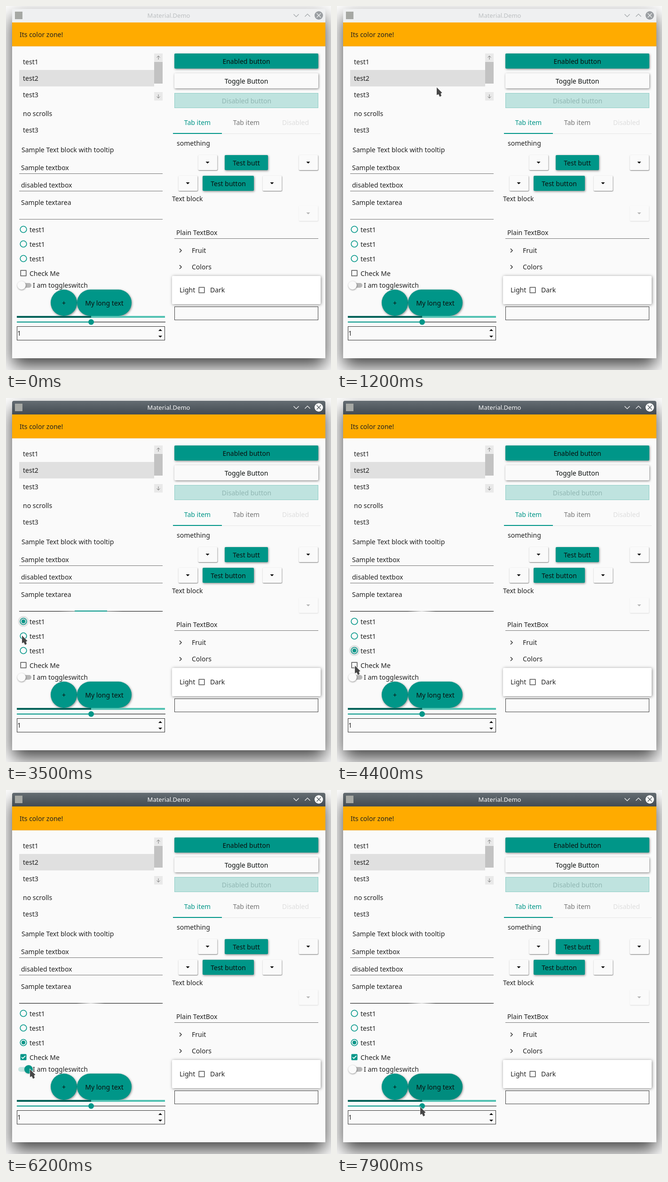
Recreate the animation shown at these times as an HTML page with a canvas. Size 691x774 px, loop 8 s.

```html
<!DOCTYPE html>
<html lang="en">
<head>
<meta charset="utf-8">
<title>Widget gallery</title>
<style>
  html, body { margin: 0; width: 100%; height: 100%; overflow: hidden; background: #fff; }
  canvas { display: block; }
</style>
</head>
<body>
<canvas id="stage" width="691" height="774"></canvas>
<script>
const ctx = document.getElementById('stage').getContext('2d');
const LOOP = 8000, STEP = 100;
const TEAL = '#009688', PAPER = '#fafafa', INK = '#212121', GREY = '#757575';

// Pointer path: time, x, y
const POINTER = [
  [200, 238, 203], [500, 222, 190], [800, 212, 173], [1400, 212, 173],
  [1600, 205, 270], [1800, 165, 525], [1900, 150, 480], [2100, 140, 437], [2600, 140, 437],
  [2900, 90, 455], [3200, 35, 473], [3400, 34, 478], [3500, 34, 505], [3700, 35, 506],
  [4000, 35, 536], [4200, 36, 538], [4400, 38, 569], [4500, 38, 583], [4600, 38, 583],
  [4800, 40, 601], [5200, 37, 567], [5400, 38, 570], [5500, 39, 579], [5600, 39, 579],
  [5800, 44, 608], [5900, 46, 596], [6200, 51, 594], [6500, 51, 594],
  [6900, 118, 632], [7100, 124, 651], [7200, 150, 640], [7400, 220, 632],
  [7600, 318, 684], [7700, 290, 683], [7900, 177, 674]
];

const clamp = v => Math.max(0, Math.min(1, v));
const ramp = (t, from, to) => clamp((t - from) / (to - from));
const between = (t, from, to) => t >= from && t < to;

function pointerAt(t) {
  if (t < POINTER[0][0]) return null;
  const next = POINTER.findIndex(p => p[0] > t);
  if (next < 0) return POINTER.at(-1).slice(1);
  const [t0, x0, y0] = POINTER[next - 1], [t1, x1, y1] = POINTER[next];
  const k = ramp(t, t0, t1);
  return [x0 + (x1 - x0) * k, y0 + (y1 - y0) * k].map(Math.round);
}

function rect(x, y, w, h, fill) {
  ctx.fillStyle = fill;
  ctx.fillRect(x, y, w, h);
}

function frame(x, y, w, h, color, width = 1) {
  ctx.strokeStyle = color;
  ctx.lineWidth = width;
  ctx.strokeRect(x + width / 2, y + width / 2, w - width, h - width);
}

function text(str, x, y, color = INK, align = 'left', size = 14) {
  ctx.font = `${size}px "Noto Sans", sans-serif`;
  ctx.textAlign = align;
  ctx.fillStyle = color;
  ctx.fillText(str, x, y);
}

function withShadow(dx, dy, blur, alpha, paint) {
  ctx.save();
  ctx.shadowColor = `rgba(0,0,0,${alpha})`;
  ctx.shadowOffsetX = dx;
  ctx.shadowOffsetY = dy;
  ctx.shadowBlur = blur;
  paint();
  ctx.restore();
}

function rounded(x, y, w, h, r, fill) {
  ctx.beginPath();
  ctx.roundRect(x, y, w, h, r);
  ctx.fillStyle = fill;
  ctx.fill();
}

function disc(x, y, r, fill) {
  ctx.beginPath();
  ctx.arc(x, y, r, 0, 7);
  ctx.fillStyle = fill;
  ctx.fill();
}

function path(points, closed) {
  ctx.beginPath();
  points.forEach(([x, y]) => ctx.lineTo(x, y));
  if (closed) ctx.closePath();
}

function polyline(points, color, width = 1) {
  path(points);
  ctx.strokeStyle = color;
  ctx.lineWidth = width;
  ctx.stroke();
}

function triangle(x, y, w, h, color = '#000') {
  path([[x - w, y - h], [x + w, y - h], [x, y + h]], true);
  ctx.fillStyle = color;
  ctx.fill();
}

function button(label, x, y, w, h, fill = TEAL, r = 2) {
  withShadow(1, 1.5, 4, 0.45, () => rounded(x, y, w, h, r, fill));
  text(label, x + w / 2, y + h / 2 + 6, '#0a0f0e', 'center');
}

function dropDown(x, y, enabled = true) {
  withShadow(0.5, 1, 2, enabled ? 0.55 : 0.12, () => rounded(x, y, 41, 32, 2, PAPER));
  triangle(x + 20, y + 16, 4, 2, enabled ? '#000' : '#b4b4b4');
}

function titleBar(t) {
  const active = t < 2300 ? 0 : t < 2400 ? 0.8 : 1;
  rounded(13, 6, 666, 30, [4, 4, 0, 0], '#eff0f1');
  const shade = ctx.createLinearGradient(0, 6, 0, 35);
  shade.addColorStop(0, '#646c72');
  shade.addColorStop(1, '#434b52');
  ctx.globalAlpha = active;
  rounded(13, 6, 666, 30, [4, 4, 0, 0], shade);
  ctx.globalAlpha = 1;
  const fore = active ? '#fcfcfc' : '#bcbfc1';
  text('Material.Demo', 346, 25, fore, 'center', 13);
  rect(19, 12, 16, 16, '#a6a8a4');
  const glyph = active ? '#fcfcfc' : '#a0a4a7';
  polyline([[611.5, 17.5], [617, 23], [622.5, 17.5]], glyph, 1.2);
  polyline([[635.5, 22.5], [641, 17], [646.5, 22.5]], glyph, 1.2);
  disc(665, 20, 9, active ? '#fcfcfc' : '#9a9ea2');
  const cross = active ? '#4b5359' : '#eff0f1';
  polyline([[660.5, 15.5], [669.5, 24.5]], cross, 1.2);
  polyline([[669.5, 15.5], [660.5, 24.5]], cross, 1.2);
}

function scrollButton(y, dir) {
  rect(315, y, 18, 18, '#e9e9e9');
  const c = y + 9;
  polyline([[324, c - 4], [324, c + 4]], '#777');
  polyline([[320.5, c + dir * 0.5], [324, c + dir * 4], [327.5, c + dir * 0.5]], '#777');
}

function list(t, pointer) {
  const scroll = between(t, 900, 1100) ? 40 : 0;
  const hovered = pointer && t < 1600 && pointer[1] < 176;
  ctx.save();
  ctx.beginPath();
  ctx.rect(28, 101, 287, 100);
  ctx.clip();
  rect(28, 136 - scroll, 287, 35, hovered ? '#dedede' : '#e0e0e0');
  for (let i = 0; i < 4; i++) text('test' + (i + 1), 36, 124 + 35 * i - scroll);
  ctx.restore();
  rect(315, 101, 18, 100, PAPER);
  scrollButton(101, -1);
  scrollButton(183, 1);
  rect(315, 119 + scroll * 0.45, 18, 46, '#c2c2c2');
  text('no scrolls', 36, 234);
  text('test3', 36, 269);
}

function textFields(t) {
  text('Sample Text block with tooltip', 33, 311);
  text('Sample textbox', 32, 349);
  rect(28, 356, 305, 1, GREY);
  text('disabled textbox', 32, 386);
  rect(28, 393, 305, 1, GREY);
  text('Sample textarea', 32, 423);
  rect(28, 453, 305, 1, t < 2300 ? GREY : t < 3400 ? '#555' : '#000');

  if (t >= 3400) {
    const reach = t < 3500 ? 110 : t < 3600 ? 68 : 30;
    const glow = ctx.createLinearGradient(180 - reach, 0, 180 + reach, 0);
    glow.addColorStop(0, 'rgba(250,250,250,0)');
    glow.addColorStop(0.5, 'rgba(250,250,250,.85)');
    glow.addColorStop(1, 'rgba(250,250,250,0)');
    rect(180 - reach, 453, 2 * reach, 1, glow);
  }
  const half = t < 2300 ? 0 : t < 2400 ? 50 : t < 3400 ? 152.5 : t < 3500 ? 105 : t < 3600 ? 34.5 : 0;
  rect(180.5 - half, 452, 2 * half, 2, TEAL);
  if (between(t, 2300, 3400)) rect(139, 409, 1, 18, '#000');
}

function radios(t) {
  const picked = t < 3300 ? -1 : t < 3700 ? 0 : t < 4100 ? 1 : 2;
  for (let i = 0; i < 3; i++) {
    const y = 475 + 31 * i;
    if (i === picked && t < 4500) disc(37, y, 11.5, '#e1e3e3');
    ctx.beginPath();
    ctx.arc(37, y, 6.8, 0, 7);
    ctx.strokeStyle = TEAL;
    ctx.lineWidth = 1.6;
    ctx.stroke();
    if (i === picked) disc(37, y, 4, TEAL);
    text('test1', 50, y + 6);
  }
}

function checkBox(x, y, checked) {
  if (!checked) return frame(x, y, 13, 13, '#555', 1.5);
  rounded(x, y, 13, 13, 1.5, TEAL);
  polyline([[x + 2.5, y + 6.5], [x + 5.2, y + 9.2], [x + 10.7, y + 3.7]], '#fff', 1.7);
}

function toggle(t) {
  const on = ramp(t, 5800, 6100) - ramp(t, 6300, 6600);
  const lit = on > 0.5;
  const x = 33 + 15 * on;
  rounded(26, 589, 28, 10, 5, lit ? '#c5e6e2' : '#b7b7b7');
  if (between(t, 5900, 6100) || between(t, 6400, 6700)) disc(x, 594, 13, 'rgba(0,0,0,.08)');
  withShadow(0.5, 1, 3, lit ? 0.25 : 0.45, () => disc(x, 594, 9, lit ? TEAL : PAPER));
  text('I am toggleswitch', 57, 599);
}

function lowerLeft(t) {
  checkBox(30.5, 561.5, t >= 5300);
  text('Check Me', 50, 574);
  toggle(t);
  button('+', 95, 603, 56, 56, between(t, 6800, 7300) ? '#008c7f' : TEAL, 28);
  button('My long text', 151, 603, 116, 56, t >= 7200 ? '#008c7e' : TEAL, 28);

  rect(23, 659, 158, 4, '#00635a');
  rect(181, 659, 157, 4, '#53c2b3');
  rect(23, 671, 158, 2, TEAL);
  rect(181, 671, 158, 2, GREY);
  disc(181, 672, 6, TEAL);

  frame(23, 681, 315, 30, '#333');
  text('1', 24, 701);
  triangle(328, 689, 4, -2);
  triangle(328, 703, 4, 2);
}

function rightColumn() {
  button('Enabled button', 358, 101, 306, 32);
  button('Toggle Button', 358, 143, 306, 32, PAPER);
  rounded(358, 185, 306, 32, 2, '#bfe3df');
  frame(358, 185, 306, 32, '#90cdc6');
  text('Disabled button', 511.5, 207, '#91b7b3', 'center');

  text('Tab item', 407, 253, TEAL, 'center');
  text('Tab item', 511, 253, GREY, 'center');
  text('Disabled', 615.5, 253, '#dedede', 'center');
  rect(459, 271, 210, 1, '#e5e5e5');
  rect(355, 270, 104, 2, TEAL);

  text('something', 363, 297);
  dropDown(408.5, 317);
  button('Test butt', 465, 317, 92, 32);
  dropDown(622.5, 317);
  dropDown(366.5, 361);
  button('Test button', 418, 361, 109, 32);
  dropDown(545.5, 361);
  text('Text block', 353, 415);
  dropDown(622.5, 425, false);
  text('Plain TextBox', 362, 487);
  rect(358, 494, 306, 1, GREY);

  ['Fruit', 'Colors'].forEach((label, i) => {
    const y = 520 + 35 * i;
    polyline([[369, y - 4], [373, y], [369, y + 4]], '#222', 1.4);
    text(label, 395, y + 5);
  });

  withShadow(1, 1, 6, 0.45, () => rounded(353, 574, 316, 60, 2, '#fff'));
  text('Light', 369, 609);
  checkBox(409.5, 597.5, false);
  text('Dark', 434, 609);
  frame(358, 639, 306, 29, '#444');
}

function drawPointer([x, y]) {
  const overText = x > 28 && x < 333 &&
    [[331, 357], [368, 394], [405, 454]].some(([top, end]) => y >= top && y < end);
  ctx.save();
  ctx.translate(x, y);
  if (overText) {
    rect(-3, -9, 6, 18, 'rgba(255,255,255,.8)');
    rect(-0.5, -8, 1, 16, '#222');
    rect(-2.5, -8.5, 5, 1, '#222');
    rect(-2.5, 7.5, 5, 1, '#222');
  } else {
    path([[0, 0], [0, 16.5], [3.8, 14.5], [6.5, 20], [10, 18], [8.5, 13], [11.5, 11.5]], true);
    ctx.strokeStyle = 'rgba(255,255,255,.8)';
    ctx.lineWidth = 1.6;
    ctx.stroke();
    ctx.fillStyle = '#474747';
    ctx.fill();
  }
  ctx.restore();
}

function draw(t) {
  const pointer = pointerAt(t);
  rect(0, 0, 691, 774, '#fff');
  withShadow(0, 17, 38, 0.75, () => rounded(13, 6, 666, 743, [4, 4, 0, 0], PAPER));
  titleBar(t);
  rect(13, 35, 666, 51, '#ffab00');
  rect(13, 85, 666, 1, '#f0b54a');
  text('Its color zone!', 29, 66);
  list(t, pointer);
  textFields(t);
  radios(t);
  lowerLeft(t);
  rightColumn();
  if (pointer) drawPointer(pointer);
}

// The screen only refreshes every STEP milliseconds.
function tick() {
  const t = performance.now() % LOOP;
  draw(Math.floor(t / STEP) * STEP);
  requestAnimationFrame(tick);
}
tick();
</script>
</body>
</html>
```
